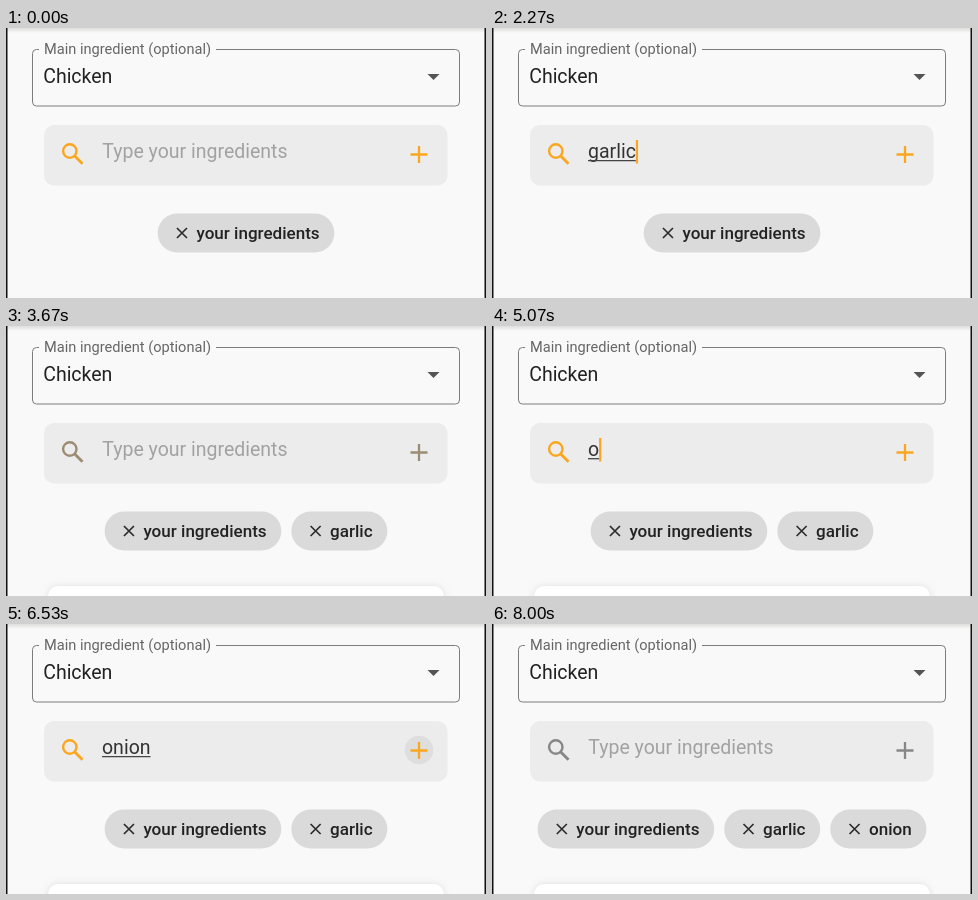
Write an HTML page with a canvas that moves like this. It is 480x270 px and loops after 8070 ms.

```html
<!DOCTYPE html>
<html lang="en">
<head>
<meta charset="utf-8">
<title>Ingredient search</title>
<style>
html, body { margin: 0; width: 100%; height: 100%; overflow: hidden; background: #f9f9f9; }
canvas { display: block; width: 480px; height: 270px; }
</style>
</head>
<body>
<canvas id="stage" width="480" height="270"></canvas>
<script>
const ctx = document.getElementById('stage').getContext('2d');
const LOOP = 8070;
const ORANGE = [250, 166, 30];
const GREY = [134, 134, 134];
const FONT = 'Roboto, Arial, sans-serif';

// [time, text in the field]
const typing = [
  [0, ''], [270, 'g'], [670, 'ga'], [740, 'gar'], [870, 'garl'], [1000, 'garli'], [1100, 'garlic'],
  [2470, ''], [4800, 'o'], [5470, 'on'], [5670, 'oni'], [5870, 'onio'], [6000, 'onion'], [6700, '']
];
// [start, end] of pressing the plus button, and when each added chip appears
const taps = [[2330, 2730], [6460, 7130]];
const added = [[2470, 'garlic'], [6700, 'onion']];

const clamp = v => Math.max(0, Math.min(1, v));
const ramp = (t, a, b) => clamp((t - a) / (b - a));

function text(str, x, y, size, color, weight = 400) {
  ctx.font = `${weight} ${size}px ${FONT}`;
  ctx.fillStyle = color;
  ctx.fillText(str, x, y);
}

function box(x, y, w, h, r, fill) {
  ctx.beginPath();
  ctx.roundRect(x, y, w, h, r);
  ctx.fillStyle = fill;
  ctx.fill();
}

function lines(color, width, ...segments) {
  ctx.strokeStyle = color;
  ctx.lineWidth = width;
  ctx.beginPath();
  for (const [x1, y1, x2, y2] of segments) {
    ctx.moveTo(x1, y1);
    ctx.lineTo(x2, y2);
  }
  ctx.stroke();
}

// 1 while the field has focus, fading between states
function focus(t) {
  if (t < 3400) return 1 - ramp(t, 2640, 3000);
  return ramp(t, 3620, 3900) - ramp(t, 6900, 7240);
}

function drawSelect() {
  ctx.strokeStyle = '#7c7c7c';
  ctx.lineWidth = 1;
  ctx.beginPath();
  ctx.roundRect(26.5, 21.5, 427, 56.5, 4);
  ctx.stroke();
  ctx.fillStyle = '#f9f9f9';
  ctx.fillRect(33, 19, 177, 5);
  text('Main ingredient (optional)', 38, 25.5, 14.6, '#666');
  text('Chicken', 37.2, 55.3, 19.5, '#222');
  ctx.fillStyle = '#555';
  ctx.beginPath();
  ctx.moveTo(421.5, 46);
  ctx.lineTo(433.5, 46);
  ctx.lineTo(427.5, 52);
  ctx.fill();
}

function drawIcons(color) {
  ctx.strokeStyle = color;
  ctx.lineWidth = 2.4;
  ctx.beginPath();
  ctx.arc(63.8, 123, 6.7, 0, Math.PI * 2);
  ctx.stroke();
  lines(color, 2.8, [68.5, 127.7, 76.5, 135.7]);
  lines(color, 2.3, [404.5, 126.5, 421.5, 126.5], [413, 118, 413, 135]);
}

function drawRipple(t) {
  for (const [start, end] of taps) {
    if (t < start || t > end) continue;
    const p = ramp(t, start, end);
    ctx.fillStyle = `rgba(0,0,0,${0.06 * Math.min(1, 2 * (1 - p))})`;
    ctx.beginPath();
    ctx.arc(413, 126, 35 * Math.sqrt(Math.min(1, p * 1.6)), 0, Math.PI * 2);
    ctx.fill();
  }
}

function drawField(t) {
  const f = focus(t);
  const color = `rgb(${GREY.map((g, i) => Math.round(g + (ORANGE[i] - g) * f))})`;
  box(38, 97, 403.5, 60.5, 10, '#ececec');
  drawRipple(t);
  drawIcons(color);

  const [since, str] = typing.filter(k => k[0] <= t).pop();
  if (!str) text('Type your ingredients', 96.3, 130, 19.5, '#a2a2a2');
  else text(str, 96, 130, 19.5, '#333');
  const w = str ? ctx.measureText(str).width : 0;
  if (str) lines('#444', 1.3, [96, 132.7, 96 + w, 132.7]);

  const blinkOn = str ? (t - since) % 1000 < 500 : t >= 3900 && t < 4400;
  if (blinkOn) {
    ctx.fillStyle = color;
    ctx.fillRect(96 + w, 112, 2.2, 23.5);
  }
}

function drawChips(t) {
  const names = ['your ingredients', ...added.filter(a => a[0] <= t).map(a => a[1])];
  ctx.font = `500 17.06px ${FONT}`;
  const widths = names.map(n => ctx.measureText(n).width + 53.5);
  const total = widths.reduce((a, b) => a + b, 10 * (names.length - 1));
  let x = 240 - total / 2;
  names.forEach((name, i) => {
    box(x, 185.5, widths[i], 39, 19.5, '#dadada');
    const cx = x + 24.3;
    lines('#2c2c2c', 1.7, [cx - 5, 200, cx + 5, 210], [cx - 5, 210, cx + 5, 200]);
    text(name, x + 38.8, 211, 17.06, '#222', 500);
    x += widths[i] + 10;
  });
}

function drawCard() {
  ctx.save();
  ctx.shadowColor = 'rgba(0,0,0,0.1)';
  ctx.shadowBlur = 6;
  box(42, 260, 396, 40, 10, '#fff');
  ctx.restore();
}

function draw(t) {
  ctx.fillStyle = '#f9f9f9';
  ctx.fillRect(0, 0, 480, 270);
  const shade = ctx.createLinearGradient(0, 0, 0, 5);
  shade.addColorStop(0, '#dededc');
  shade.addColorStop(1, '#f9f9f9');
  ctx.fillStyle = shade;
  ctx.fillRect(0, 0, 480, 5);
  drawSelect();
  drawField(t);
  drawChips(t);
  if (t >= added[0][0]) drawCard();
  ctx.fillStyle = '#111';
  ctx.fillRect(0, 0, 1.5, 270);
  ctx.fillRect(478.5, 0, 1.5, 270);
}

let start;
function tick(now) {
  start ??= now;
  draw(Math.max(0, now - start) % LOOP);
  requestAnimationFrame(tick);
}
draw(0);
requestAnimationFrame(tick);
</script>
</body>
</html>
```
